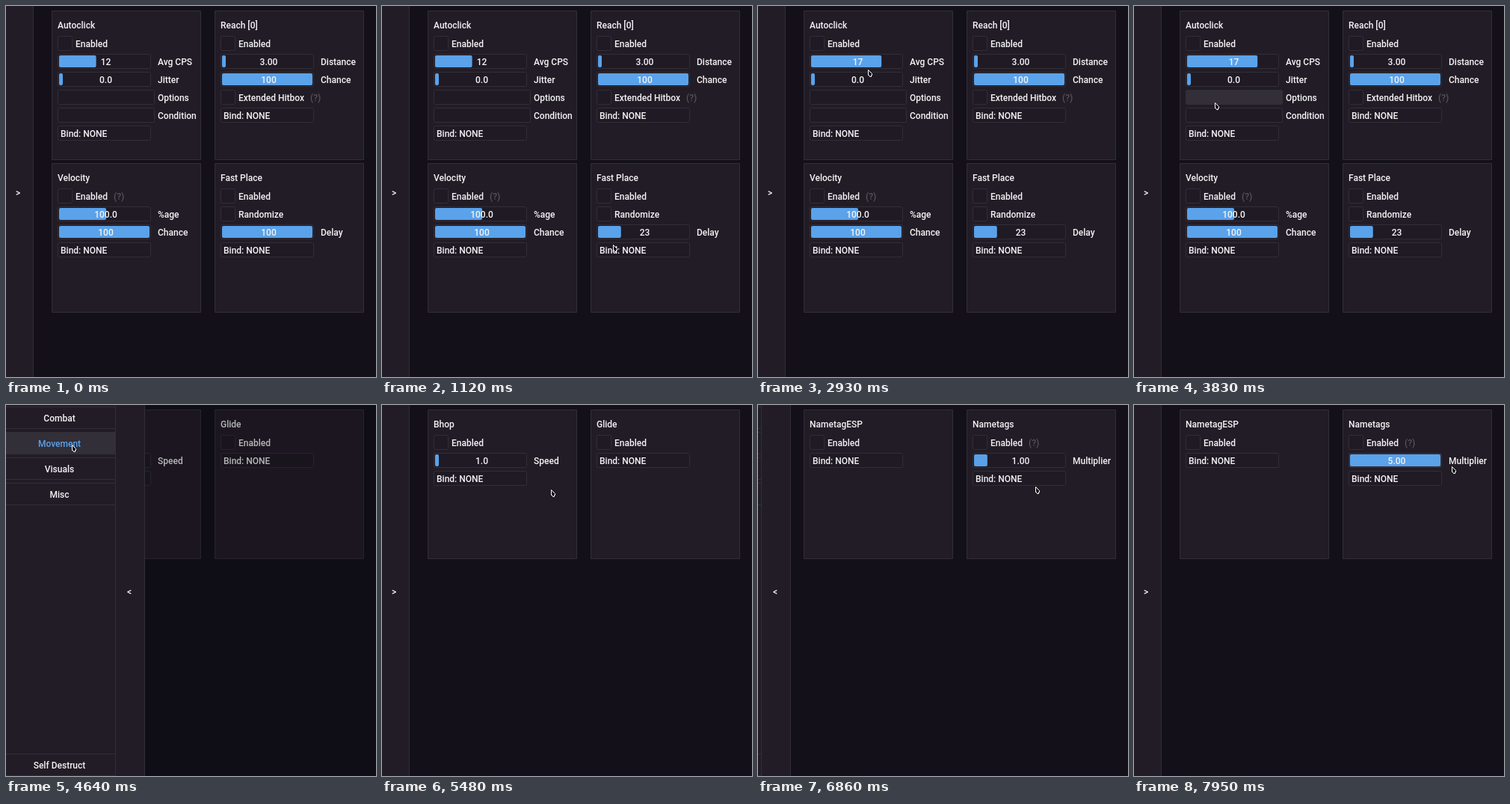
An HTML page with a canvas that plays this animation: 495 by 496 pixels, repeating every 8 s.

```html
<!DOCTYPE html>
<html lang="en">
<head>
<meta charset="utf-8">
<title>Settings panel</title>
<style>
html, body { margin: 0; width: 100%; height: 100%; overflow: hidden; background: #13101a; }
canvas { display: block; width: 495px; height: 496px; }
</style>
</head>
<body>
<canvas id="stage" width="495" height="496"></canvas>
<script>
const ctx = document.getElementById('stage').getContext('2d');
const W = 495, H = 496, LOOP = 8000, SLIDE = 190;
const BG = '#13101a', PANEL = '#221c26', BOX = '#1f1a24', LINE = '#322e38';
const HOVER = '#322f38', BLUE = '#5aa2ea', TEXT = '#f4f3f5', FAINT = '#57525c';
const TABS = ['Combat', 'Movement', 'Visuals', 'Misc'];
const BUTTON = { step: 34, height: 30 };

const clamp = v => Math.max(0, Math.min(1, v));
const mix = (a, b, k) => a + (b - a) * k;
const ease = k => k * k * (3 - 2 * k);

// Layout: panels on a grid, rows inside a panel
const panelX = col => 61 + col * 218;
const panelY = row => 6 + row * 204;
const rowX = col => panelX(col) + 8;
const rowY = (row, i) => panelY(row) + 34 + i * 24;
const knobX = (col, pos) => rowX(col) + 4.5 + 116 * pos;
const knobPos = (x, col) => clamp((x - rowX(col) - 4.5) / 116);
const buttonY = i => 2 + i * BUTTON.step;

// Timeline: pointer moves and state changes, written in order
const moves = [], events = [];
let clock = 0, spot = { x: W + 99, y: H + 99 };
const wait = until => { clock = until; };
const set = change => events.push({ at: clock, change });
const jump = (x, y) => { spot = { x, y }; };
function go(until, x, y) {
  moves.push({ start: clock, end: until, from: spot, to: { x, y } });
  clock = until;
  spot = { x, y };
}
const slideMenu = target => set({ from: 1 - target, target, since: clock });

function script() {
  const delayY = rowY(1, 3) + 11, cpsY = rowY(0, 1) + 10, lensY = rowY(0, 1) + 11;
  set({ tab: 0, grabbed: '', delay: 100, cps: 12, zoom: 1, from: 0, target: 0, since: 0 });
  wait(170);
  jump(W, 482);
  go(450, knobX(1, .83), delayY);
  set({ grabbed: 'Delay' });
  go(790, knobX(1, 0) - 18, delayY - 30);
  go(1030, 317, delayY);
  set({ grabbed: '', delay: 23 });
  go(1890, 94, 56);
  go(2120, knobX(0, 5 / 13), cpsY);
  set({ grabbed: 'Avg CPS' });
  go(2300, knobX(0, 1), cpsY);
  go(2750, knobX(0, 10 / 13), cpsY);
  set({ grabbed: '', cps: 17 });
  go(3310, 104, 117);
  go(3830, 109, 129);
  go(4005, 26, 90);
  slideMenu(1);
  go(4450, 80, 54);
  set({ tab: 1 });
  go(4640, 89, 53);
  wait(4780);
  go(4870, 192, 82);
  slideMenu(0);
  go(5070, 240, 115);
  wait(5390);
  go(6000, 27, 75);
  slideMenu(1);
  go(6050, 23, 75);
  go(6190, 46, 80);
  wait(6290);
  go(6430, 48, 86);
  wait(6620);
  set({ tab: 2 });
  go(6680, 130, 92);
  slideMenu(0);
  go(6860, 372, 109);
  go(7430, knobX(1, .05), lensY);
  set({ grabbed: 'Multiplier' });
  go(7620, knobX(1, .11), lensY);
  wait(7760);
  go(7950, 426, 82);
}

function pointerAt(t) {
  const move = moves.findLast(m => m.start <= t);
  if (!move) return { x: W + 99, y: H + 99 };
  const k = ease(clamp((t - move.start) / (move.end - move.start)));
  return {
    x: Math.round(mix(move.from.x, move.to.x, k)),
    y: Math.round(mix(move.from.y, move.to.y, k))
  };
}

function stateAt(t) {
  const state = {};
  for (const e of events) if (e.at <= t) Object.assign(state, e.change);
  state.open = mix(state.from, state.target, clamp((t - state.since) / SLIDE));
  return state;
}

let mouse, state;
const over = (x, y, w, h) =>
  mouse.x >= x && mouse.x < x + w && mouse.y >= y && mouse.y < y + h;
const hot = (x, y, w) => !state.grabbed && over(x, y, w, 20);
const dragged = (label, col, min, max, rest) =>
  state.grabbed === label ? mix(min, max, knobPos(mouse.x, col)) : rest;

function text(s, x, y, color = TEXT, align = 'left') {
  ctx.fillStyle = color;
  ctx.textAlign = align;
  ctx.fillText(s, x, y);
}

function fill(x, y, w, h, color) {
  ctx.fillStyle = color;
  ctx.fillRect(x, y, w, h);
}

function frame(x, y, w, h, bg, r = 2) {
  ctx.beginPath();
  ctx.roundRect(x + .5, y + .5, w - 1, h - 1, r);
  ctx.fillStyle = bg;
  ctx.fill();
  ctx.strokeStyle = LINE;
  ctx.stroke();
}

const widgets = {
  check(x, y, label, hint) {
    const w = ctx.measureText(label).width;
    frame(x, y, 20, 20, hot(x, y, 24 + w) ? HOVER : BOX);
    text(label, x + 24, y + 15);
    if (hint) text('(?)', x + 32 + w, y + 15, FAINT);
  },
  slide(x, y, label, value, pos) {
    const lit = state.grabbed === label || hot(x, y, 125);
    frame(x, y, 125, 20, lit ? HOVER : BOX);
    ctx.beginPath();
    ctx.roundRect(x + 2, y + 2, 5 + 116 * pos, 16, 2);
    ctx.fillStyle = BLUE;
    ctx.fill();
    text(value, x + 64.5, y + 15, TEXT, 'center');
    text(label, x + 134, y + 15);
  },
  combo(x, y, label) {
    frame(x, y, 130, 20, hot(x, y, 130) ? HOVER : BOX);
    text(label, x + 134, y + 15);
  },
  bind(x, y) {
    frame(x, y, 125, 20, BOX);
    text('Bind: NONE', x + 4, y + 15);
  }
};

function panel(col, row, title, items) {
  frame(panelX(col), panelY(row), 200, 200, PANEL, 0);
  text(title, rowX(col), panelY(row) + 24);
  items.forEach(([kind, ...args], i) => widgets[kind](rowX(col), rowY(row, i), ...args));
}

const ENABLED = ['check', 'Enabled'], HINTED = ['check', 'Enabled', true], BIND = ['bind'];
const CHANCE = ['slide', 'Chance', '100', 1];

function combat() {
  const cps = Math.round(dragged('Avg CPS', 0, 7, 20, state.cps));
  const delay = Math.round(dragged('Delay', 1, 1, 100, state.delay));
  panel(0, 0, 'Autoclick', [ENABLED,
    ['slide', 'Avg CPS', cps, (cps - 7) / 13],
    ['slide', 'Jitter', '0.0', 0],
    ['combo', 'Options'], ['combo', 'Condition'], BIND]);
  panel(1, 0, 'Reach [0]', [ENABLED,
    ['slide', 'Distance', '3.00', 0], CHANCE,
    ['check', 'Extended Hitbox', true], BIND]);
  panel(0, 1, 'Velocity', [HINTED, ['slide', '%age', '100.0', .5], CHANCE, BIND]);
  panel(1, 1, 'Fast Place', [ENABLED, ['check', 'Randomize'],
    ['slide', 'Delay', delay, (delay - 1) / 99], BIND]);
}

function movement() {
  panel(0, 0, 'Bhop', [ENABLED, ['slide', 'Speed', '1.0', 0], BIND]);
  panel(1, 0, 'Glide', [ENABLED, BIND]);
}

function visuals() {
  const zoom = dragged('Multiplier', 1, .5, 5, state.zoom);
  panel(0, 0, 'NametagESP', [ENABLED, BIND]);
  panel(1, 0, 'Nametags', [HINTED,
    ['slide', 'Multiplier', zoom.toFixed(2), (zoom - .5) / 4.5], BIND]);
}

function menu() {
  const { open, tab } = state;
  const right = Math.round(mix(36, 185, open));
  const split = right - 39;
  fill(0, 0, right, H, PANEL);
  fill(right, 0, 1, H, LINE);
  const button = (label, y, color) => {
    if (open === 1 && over(0, y, split, BUTTON.height)) fill(0, y, split, BUTTON.height, HOVER);
    fill(0, y, split, 1, LINE);
    fill(0, y + BUTTON.height - 1, split, 1, LINE);
    text(label, right - 113.5, y + 20, color, 'center');
  };
  if (open > 0) {
    TABS.forEach((label, i) => button(label, buttonY(i), i === tab ? BLUE : TEXT));
    button('Self Destruct', H - BUTTON.height, TEXT);
    fill(split, 0, 1, H, LINE);
  }
  text(open > 0 ? '<' : '>', right - 20, 254, TEXT, 'center');
}

function pointer() {
  ctx.save();
  ctx.translate(mouse.x - .5, mouse.y + .5);
  ctx.beginPath();
  [[0, 0], [5, 5], [5, 7], [4, 7], [4, 9], [2, 9], [1, 7], [0, 7]]
    .forEach(([x, y]) => ctx.lineTo(x, y));
  ctx.closePath();
  ctx.fillStyle = '#121014';
  ctx.fill();
  ctx.strokeStyle = '#fff';
  ctx.stroke();
  ctx.restore();
}

function draw(t) {
  mouse = pointerAt(t);
  state = stateAt(t);
  ctx.font = '500 12px Roboto, sans-serif';
  ctx.lineWidth = 1;
  fill(0, 0, W, H, BG);
  [combat, movement, visuals][state.tab]();
  fill(0, 0, W, H, `rgba(4,6,8,${.25 * state.open})`);
  menu();
  pointer();
}

script();
const begin = performance.now();
function tick() {
  draw((performance.now() - begin) % LOOP);
  requestAnimationFrame(tick);
}
tick();
</script>
</body>
</html>
```
